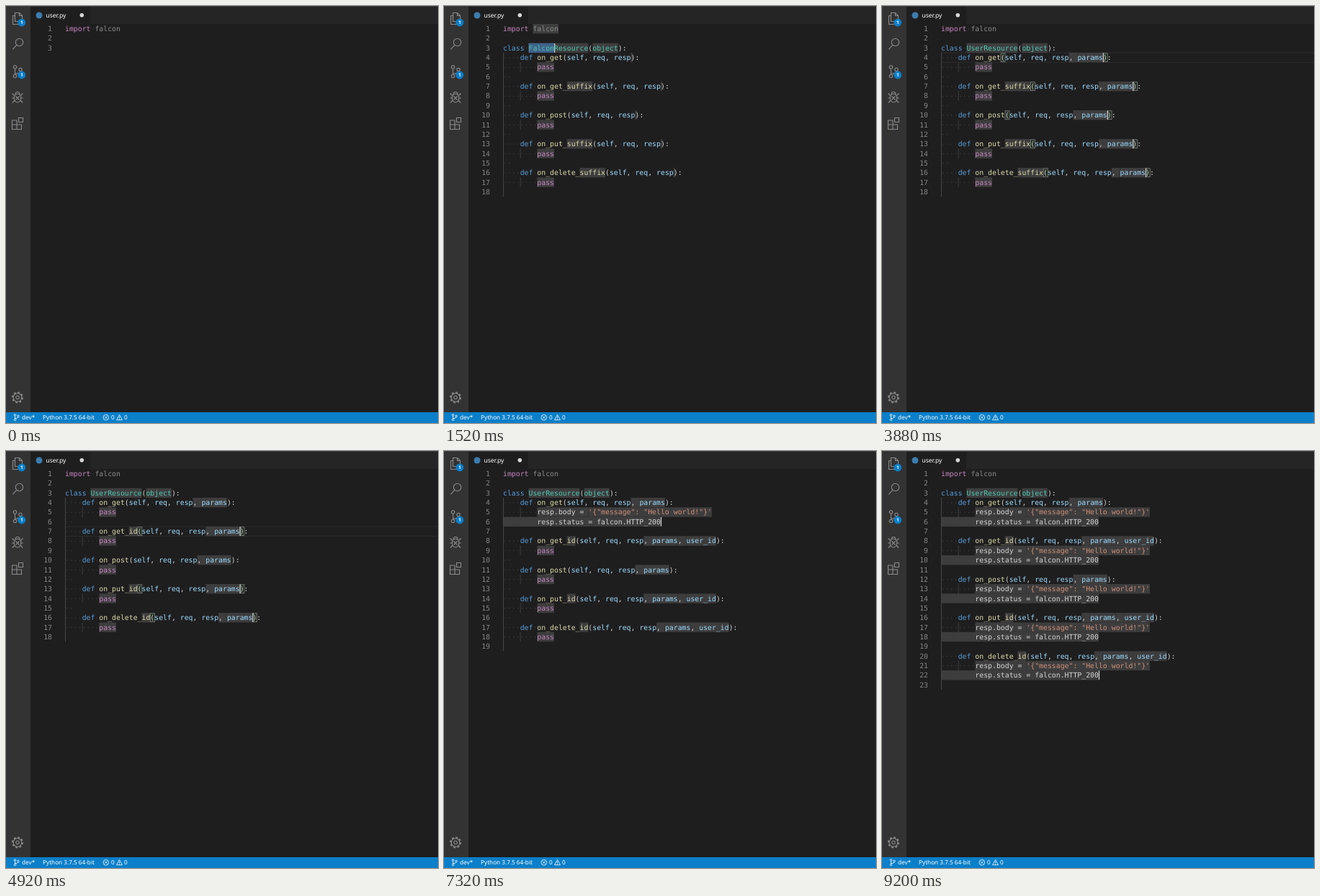
Write an HTML page that moves like this. It is 600 by 580 pixels and loops after 9240 ms.

```html
<!DOCTYPE html>
<html lang="en">
<head>
<meta charset="utf-8">
<title>Code editor</title>
<style>
html, body { margin: 0; width: 100%; height: 100%; overflow: hidden; background: #1f1e1f; }
svg { display: block; width: 600px; height: 580px; }
text { text-rendering: geometricPrecision; }
#code { font: 9.83px "DejaVu Sans Mono", monospace; }
.ui { font: 8.2px "Noto Sans", "Open Sans", sans-serif; fill: #fff; }
.icons { fill: none; stroke: #8b8b8b; stroke-width: 1.1; }
.small { fill: none; stroke: #fff; stroke-width: .8; }
</style>
</head>
<body>
<svg viewBox="0 0 600 580">
  <rect width="600" height="580" fill="#1f1e1f"/>
  <rect x="34" width="566" height="25" fill="#252526"/>
  <rect x="34" width="83" height="25" fill="#1f1e1f"/>
  <rect width="34" height="565" fill="#333334"/>
  <rect width="600" height="1" fill="#3d3d3d"/>

  <circle cx="46" cy="13" r="4.5" fill="#3d7cae"/>
  <text class="ui" x="55.5" y="16" style="font-size:8.5px">user.py</text>
  <circle cx="105.3" cy="12.8" r="2.8" fill="#d8d8d8"/>

  <g class="icons">
    <path d="M12.5 9.5h6l4 4v8h-10zM18.5 9.5v4h4M12.5 13.5h-3v12h9v-4"/>
    <circle cx="18.5" cy="50.5" r="5.2"/><path d="M14.8 54.3l-5.6 6"/>
    <circle cx="12.5" cy="85" r="2.2"/><circle cx="12.5" cy="97.5" r="2.2"/><circle cx="20" cy="88.5" r="2.2"/>
    <path d="M12.5 87.2v8.1M20 90.7q-.5 3.3-7 3.6"/>
    <ellipse cx="16" cy="128" rx="4.8" ry="6"/>
    <path d="M13 123q0-3.5 3-3.5t3 3.5M13.5 125.5l5 5m0-5l-5 5M11.5 124.5l-3-3M20.5 124.5l3-3M11.2 128h-3M20.8 128h3M11.8 131.5l-3 3M20.2 131.5l3 3"/>
    <path d="M8.5 159h6.500v12.500h-6.500zM8.500 165h13v6.500h-13M17.500 155.500h6v6h-6z"/>
    <circle cx="16" cy="544.5" r="5.8"/><circle cx="16" cy="544.500" r="2.2"/>
    <circle cx="16" cy="544.5" r="7" stroke-width="2" stroke-dasharray="2.75 2.75"/>
  </g>
  <g fill="#0b7fc9"><circle cx="21.8" cy="23" r="5.4"/><circle cx="21.8" cy="96" r="5.4"/></g>
  <g class="ui" text-anchor="middle" style="font-size:6.5px;font-weight:600">
    <text x="21.8" y="25.4">1</text><text x="21.8" y="98.4">1</text>
  </g>

  <g id="code"></g>

  <rect y="565" width="600" height="15" fill="#0b7fc9"/>
  <g class="small">
    <circle cx="12.5" cy="569" r="1.3"/><circle cx="12.5" cy="575.5" r="1.3"/><circle cx="17" cy="570.5" r="1.3"/>
    <path d="M12.500 570.300v3.900M17 571.800q-.2 1.700-4.500 2"/>
    <circle cx="138.800" cy="572.300" r="3.800"/><path d="M137.200 570.700l3.200 3.200m0-3.200l-3.200 3.200"/>
    <path d="M157.500 568.500l4 7.200h-8zM157.500 571v2.300M157.500 574.200v.8"/>
  </g>
  <g class="ui">
    <text x="22" y="575.3">dev*</text>
    <text x="51" y="575.3">Python 3.7.5 64-bit</text>
    <text x="146" y="575.3">0</text>
    <text x="164" y="575.3">0</text>
  </g>
</svg>
<script>
const LOOP = 9240, LEFT = 82, TOP = 25, CW = 5.918, LH = 13.34;
const C = {
  plain: '#d4d4d4', dim: '#8c8c8c', flow: '#c586c0', word: '#569cd6', type: '#4ec9b0',
  func: '#dcdcaa', arg: '#9cdcfe', str: '#ce9178', number: '#858585'
};
const INSERT = 1300, OBJECT = 2040, ARGS = 2200, SUFFIX = 4000, MORE = 4500;
const TABS = [6960, 7480, 8040, 8440, 8800], PASTES = [7240, 7740, 8240, 8600, 8960];
const METHODS = [['get', 0], ['get', 1], ['post', 0], ['put', 1], ['delete', 1]];

// text, start, ms per key
const KEYS = {
  prefix: ['falcon', 240, 100],
  name: ['User', 1640, 80],
  params: [', params', 3040, 100],
  suffix: ['id', 4240, 100],
  user: [', user_id', 5880, 100]
};
const typed = (key, t) => {
  const [text, start, step] = KEYS[key];
  return text.slice(0, Math.max(0, Math.floor((t - start) / step) + 1));
};
const moves = [-500, INSERT, OBJECT, ARGS, SUFFIX, MORE, ...TABS, ...PASTES];
for (const [text, start, step] of Object.values(KEYS))
  for (let i = 0; i < text.length; i++) moves.push(start + i * step);

const within = (t, a, b) => t >= a && t < b;
const rect = (x, y, w, h, fill) => `<rect x="${x}" y="${y}" width="${w}" height="${h}" fill="${fill}"/>`;

// flags: h placeholder, s selected, b bracket box, c caret after
function drawLine(parts, row, caretOn) {
  const y = TOP + row * LH;
  let col = 0, back = '', front = '';
  for (const [text, color, flags = ''] of parts) {
    const x = LEFT + col * CW, w = text.length * CW;
    if (flags.includes('h')) back += rect(x, y, Math.max(w, 2), LH, '#3e3d3e');
    if (flags.includes('s')) back += rect(x, y, w, LH, '#3f618a');
    if (flags.includes('b'))
      back += `<rect x="${x + .3}" y="${y + .8}" width="${w}" height="${LH - 1.5}" fill="#1d2a1d" stroke="#888" stroke-width=".8"/>`;
    for (const m of text.matchAll(/\S+/g))
      front += `<text x="${x + m.index * CW}" y="${y + 10.1}" fill="${color}">${m[0]}</text>`;
    for (const m of text.matchAll(/ /g))
      front += `<circle cx="${x + (m.index + .5) * CW}" cy="${y + 6.9}" r=".6" fill="#484848"/>`;
    if (flags.includes('c') && caretOn) front += rect(x + w, y + .3, 1.2, LH - .6, '#d0d0d0');
    col += text.length;
  }
  const number = `<text x="64" y="${y + 10.1}" text-anchor="end" fill="${C.number}">${row + 1}</text>`;
  return back + front + number;
}

function method([verb, hasId], i, t) {
  const all = within(t, ARGS, SUFFIX), some = hasId && within(t, MORE, TABS[0]);
  const box = all || some ? 'b' : '';
  const picked = within(t, SUFFIX, KEYS.suffix[1]) ? 'hsc' : 'h';
  const editing = within(t, KEYS.suffix[1], MORE) ? 'hc' : picked;
  const id = t < KEYS.suffix[1] ? 'suffix' : typed('suffix', t);
  const extra = typed('params', t) + (hasId ? typed('user', t) : '');
  const head = [['    ', C.plain], ['def', C.word], [' ', C.plain], ['on_' + verb + (hasId ? '_' : ''), C.func]];
  if (hasId) head.push([id, C.func, editing]);
  head.push(['(', C.plain, box]);
  ['self', 'req', 'resp'].forEach((a, n) => {
    if (n) head.push([', ', C.plain]);
    head.push([a, C.arg]);
  });
  // commas stay neutral inside the placeholder
  const bits = extra.match(/, ?|\w+/g) || [''];
  bits.forEach((b, n) => head.push([b, b[0] === ',' ? C.plain : C.arg, 'h' + (box && n === bits.length - 1 ? 'c' : '')]));
  head.push([')', C.plain, box], [':', C.plain]);

  if (t < PASTES[i])
    return [head, [['        ', C.plain], ['pass', C.flow, t >= TABS[i] ? 'hsc' : 'h']], [['  ', C.plain]]];
  const caret = t < (TABS[i + 1] || LOOP) ? 'hc' : 'h';
  return [head,
    [['        ', C.plain], ['resp.body = ', C.plain, 'h'], [`'{"message": "Hello world!"}'`, C.str, 'h']],
    [['        resp.status = falcon.HTTP_200', C.plain, caret]],
    []];
}

function render(t) {
  const last = Math.max(...moves.filter(m => m <= t));
  const caretOn = (t - last) % 1000 < 500;
  const naming = within(t, INSERT, KEYS.name[1]);
  const lines = [[['import', C.flow], [' ', C.plain], ['falcon', C.dim, naming ? 'h' : '']], []];
  let out = '';
  if (t < INSERT) {
    lines.push([[typed('prefix', t), C.plain, 'c']]);
  } else {
    const name = naming ? 'Falcon' : typed('name', t);
    const nameFlags = naming ? 'hsc' : t < OBJECT ? 'hc' : 'h';
    lines.push([['class', C.word], [' ', C.plain], [name, C.type, nameFlags], ['Resource', C.type, 'h'],
      ['(', C.plain], ['object', C.type, within(t, OBJECT, ARGS) ? 'hsc' : 'h'], ['):', C.plain]]);
    METHODS.forEach((m, i) => lines.push(...method(m, i, t)));
    lines[lines.length - 1] = [];

    const current = within(t, ARGS, SUFFIX) ? 3 : within(t, KEYS.suffix[1], TABS[0]) ? 6 : 0;
    if (current) for (const edge of [0, 1])
      out += rect(LEFT, TOP + (current + edge) * LH - .5, 600 - LEFT, 1, '#2c2b2c');
  }
  lines.forEach((parts, row) => out += drawLine(parts, row, caretOn));
  lines.forEach((parts, row) => {
    if (row < 3) return;
    const y = TOP + row * LH;
    out += rect(LEFT, y, .9, LH, '#4a4a4a');
    if (parts[0] && parts[0][0].startsWith('        ')) out += rect(LEFT + 4 * CW, y, .9, LH, '#424242');
  });
  return out;
}

const code = document.getElementById('code');
let shown = null;
const begin = performance.now();
function tick() {
  const next = render((performance.now() - begin) % LOOP);
  if (next !== shown) code.innerHTML = shown = next;
  requestAnimationFrame(tick);
}
tick();
</script>
</body>
</html>
```
